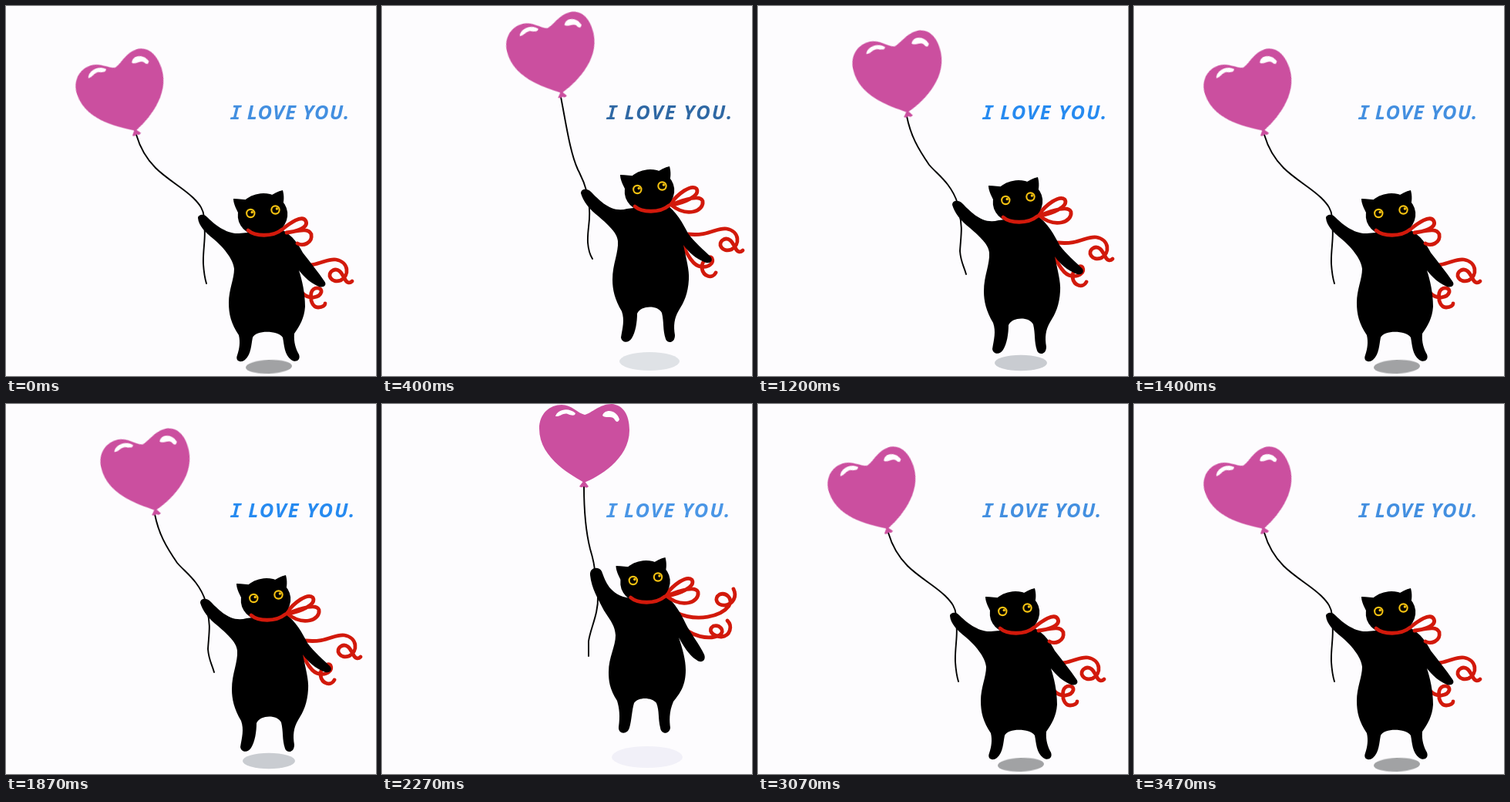
Animation of 480 by 480 pixels, one loop 3.67 s. Source, as an HTML page:

```html
<!DOCTYPE html>
<html lang="en">
<head>
<meta charset="utf-8">
<title>I love you</title>
<style>
html, body { margin: 0; width: 100%; height: 100%; overflow: hidden; background: #fdfcfe; }
svg { display: block; width: 100vw; height: 100vh; }
.pose { opacity: 0; animation: 3670ms step-end infinite; }
.low { animation-name: low; }
.rise { animation-name: rise; }
.float { animation-name: float; }
.top { animation-name: top; }
.dip { animation-name: dip; }
.line { fill: none; stroke: #000; stroke-width: 1.9; stroke-linecap: round; stroke-linejoin: round; }
.ribbon { fill: none; stroke: #d2190b; stroke-width: 4.8; stroke-linecap: round; stroke-linejoin: round; }
.words { font: italic 700 25.4px "Open Sans", sans-serif; animation: words 3670ms step-end infinite; }
.words tspan { font-family: "Noto Sans Mono", monospace; }

@keyframes low {
  0%, 38.147%, 45.504%, 83.651%, 94.55%, 100% { opacity: 1; }
  5.449%, 43.596%, 50.953%, 89.1% { opacity: 0; }
}
@keyframes rise {
  0%, 10.899%, 38.147%, 56.403%, 83.651%, 100% { opacity: 0; }
  5.449%, 32.697%, 50.953%, 78.201% { opacity: 1; }
}
@keyframes float {
  0%, 16.348%, 32.697%, 61.852%, 78.201%, 100% { opacity: 0; }
  10.899%, 27.247%, 56.403%, 72.752% { opacity: 1; }
}
@keyframes top {
  0%, 27.247%, 72.752%, 100% { opacity: 0; }
  16.348%, 61.852% { opacity: 1; }
}
@keyframes dip {
  0%, 45.504%, 94.55%, 100% { opacity: 0; }
  43.596%, 89.1% { opacity: 1; }
}
@keyframes words {
  0%, 38.147%, 83.651%, 100% { fill: #438fe0; letter-spacing: 1.2px; }
  5.449%, 32.697%, 50.953%, 78.201% { fill: #268af0; letter-spacing: 1.9px; }
  10.899%, 27.247%, 56.403%, 72.752% { fill: #2f68a4; letter-spacing: 2.1px; }
  16.348%, 67.302% { fill: #3b7fc6; letter-spacing: 2px; }
  21.798%, 61.852% { fill: #4a96e6; letter-spacing: 1.8px; }
}
</style>
</head>
<body>
<svg viewBox="0 0 480 480">
  <defs>
    <!-- Balloon, with its tip at the origin -->
    <g id="balloon">
      <g fill="#cb4f9f">
        <path d="M0 0C-12-8-58-30-58-70C-58-90-44-101-29-101C-16-101-8-90 1-88C10-90 20-102 36-102C50-101 59-89 59-68C59-30 18-7 0 0Z"/>
        <path d="M0-3L-6 5Q-3 7 0 5Q3 8 6 5Z"/>
      </g>
      <g fill="#fff">
        <path d="M-37-86C-35-94-21-99-11-90C-12-86-16-87-21-89C-27-91-31-85-37-86Z"/>
        <path d="M24-87C27-96 42-95 46-82C44-77 41-79 39-83C35-87 28-83 24-87Z"/>
      </g>
    </g>

    <g id="eye">
      <circle r="6.2" fill="#f5c211"/>
      <circle r="4.1"/>
      <circle cx="1.9" cy="-1.5" r="1.7" fill="#f5c211"/>
    </g>

    <g id="head">
      <ellipse cx="333" cy="271" rx="32.3" ry="28" transform="rotate(-6 333 271)"/>
      <path d="M302 270C298 262 295 256 295 250C302 250 309 251 317 252ZM341 247C347 244 353 240 359 239C361 246 361 254 358 262Z"/>
      <use href="#eye" x="317.3" y="269"/>
      <use href="#eye" x="349.5" y="264.5"/>
      <path class="ribbon" d="M314 291C323 299 346 300 358 290"/>
    </g>

    <path id="bow" class="ribbon" d="M367 249C378 234 395 222 402 228C408 237 385 247 369 249C388 241 407 236 410 244C412 257 390 266 369 249"/>
    <path id="curl" class="ribbon" d="M378 336C405 339 415 327 428 329C445 332 446 350 434 356C422 360 415 348 424 343C432 339 436 348 439 353C442 360 446 360 449 357"/>
    <path id="tail" class="ribbon" d="M390 310C396 322 404 338 414 338C424 340 431 333 428 327C424 322 414 332 415 340C417 352 429 354 433 346"/>

    <path id="hang" d="M252 258C252 252 260 251 265 256C276 267 291 284 312 278L362 272C375 280 385 298 391 310C400 322 412 332 421 341C424 347 418 350 412 347C402 343 392 335 385 325C388 340 393 358 392 370C391 388 386 399 379 410C373 420 372 430 374 442C374 453 364 453 362 447C358 435 360 425 357 413C352 403 330 403 325 414C325 425 323 438 318 446C314 453 305 452 304 445C306 432 309 423 305 411C296 396 293 383 293 370C293 350 301 335 300 320C299 308 285 297 275 288C262 278 255 268 252 258Z"/>

    <g id="sitter">
      <use href="#curl"/>
      <path class="ribbon" d="M384 372C394 382 407 378 409 371C410 364 398 364 396 372C394 382 398 391 405 391C411 391 414 388 414 386"/>
      <path d="M249 275C249 271 256 269 260 273C270 283 286 296 302 295L358 290C372 298 380 310 385 320C395 333 405 345 413 357C417 362 412 366 406 364C396 360 387 352 380 343C384 355 388 372 388 390C387 405 381 415 374 425C373 436 376 445 380 452C383 460 375 463 370 459C361 452 361 440 359 430C353 421 325 420 320 430C318 440 318 452 310 459C304 464 297 460 300 453C303 444 304 436 302 427C292 412 289 400 289 385C289 368 296 354 296 341C295 328 281 312 269 302C258 293 250 285 249 275Z"/>
      <path class="ribbon" d="M358 290C368 282 384 270 389 279C393 288 375 293 364 294C378 292 392 287 396 296C398 308 385 312 378 308"/>
      <use href="#head"/>
    </g>
  </defs>

  <rect width="480" height="480" fill="#fdfcfe"/>
  <text class="words" x="288.5" y="146.5"><tspan>I</tspan> LOVE YOU.</text>

  <g class="pose low">
    <ellipse cx="341" cy="468" rx="30" ry="9" fill="#a1a2a4" transform="rotate(-2 341 468)"/>
    <path class="line" d="M169 167C174 184 181 197 194 210C209 225 230 236 243 249C252 258 256 264 257 274M257 284C260 296 255 318 256 335Q257 350 260 360"/>
    <use href="#balloon" transform="translate(168 162) rotate(-18.5) scale(.98)"/>
    <use href="#sitter"/>
  </g>

  <g class="pose rise">
    <ellipse cx="341" cy="463" rx="34" ry="10.3" fill="#c9ccd1"/>
    <path class="line" d="M193 143C198 168 207 184 222 206C232 218 250 229 259 256M261 270C266 285 263 300 262 318C263 332 267 337 270 348"/>
    <use href="#balloon" transform="translate(194 138) rotate(-12) scale(.99)"/>
    <use href="#curl" x="11" y="-29"/>
    <use href="#tail" x="-7" y="12"/>
    <use href="#hang"/>
    <use href="#bow" x="-4" y="23"/>
    <use href="#head" x="4" y="-17"/>
  </g>

  <g class="pose float">
    <ellipse cx="347" cy="461" rx="39" ry="12" fill="#dfe2e6"/>
    <path class="line" d="M232 118C239 154 244 190 254 212C259 222 262 227 266 242M268 255C272 275 266 288 267 307Q268 320 273 328"/>
    <use href="#balloon" transform="translate(233 113) rotate(-13) scale(.98)"/>
    <use href="#curl" x="19" y="-40"/>
    <use href="#tail"/>
    <use href="#hang" x="6" y="-15"/>
    <use href="#bow" x="6" y="9"/>
    <use href="#head" x="14" y="-31"/>
  </g>

  <g class="pose top">
    <ellipse cx="344" cy="458" rx="46" ry="14" fill="#f1f0f8"/>
    <path class="line" d="M262 107C262 140 265 168 270 188C273 198 276 208 276 218M280 250C281 272 270 292 268 308L268 327"/>
    <use href="#balloon" x="262" y="102"/>
    <path class="ribbon" d="M380 270C410 284 440 275 450 262C456 252 446 244 438 247C430 252 434 262 446 261C455 259 461 250 456 240"/>
    <path class="ribbon" d="M386 284C400 303 425 306 438 300C446 294 438 286 430 288C422 293 428 301 440 302C452 301 455 288 448 281"/>
    <path d="M270 222C269 212 281 210 285 217C290 230 295 248 322 252L368 248C380 258 388 272 394 285C400 297 412 312 418 325C421 333 414 337 408 332C398 326 390 312 385 303C390 318 394 332 394 345C394 365 387 375 378 386C372 400 373 412 374 420C373 429 362 429 361 420C358 408 360 398 356 388C350 380 332 380 327 388C324 398 324 410 321 420C318 430 306 428 307 419C309 405 308 395 305 385C295 370 294 358 294 348C294 328 303 315 303 300C302 288 298 283 288 268C280 252 272 240 270 222Z"/>
    <use href="#bow"/>
    <use href="#head" x="8.5" y="-40"/>
  </g>

  <g class="pose dip">
    <ellipse cx="339" cy="470" rx="29" ry="8.7" fill="#8b8c8f"/>
    <path class="line" d="M142 185C149 202 158 214 174 225C196 239 226 243 240 259C249 267 252 271 254 280M254 290C257 302 252 324 253 341Q254 356 257 366"/>
    <use href="#balloon" transform="translate(141 180) rotate(-22) scale(.98)"/>
    <use href="#sitter" x="-3" y="6"/>
  </g>
</svg>
</body>
</html>
```
